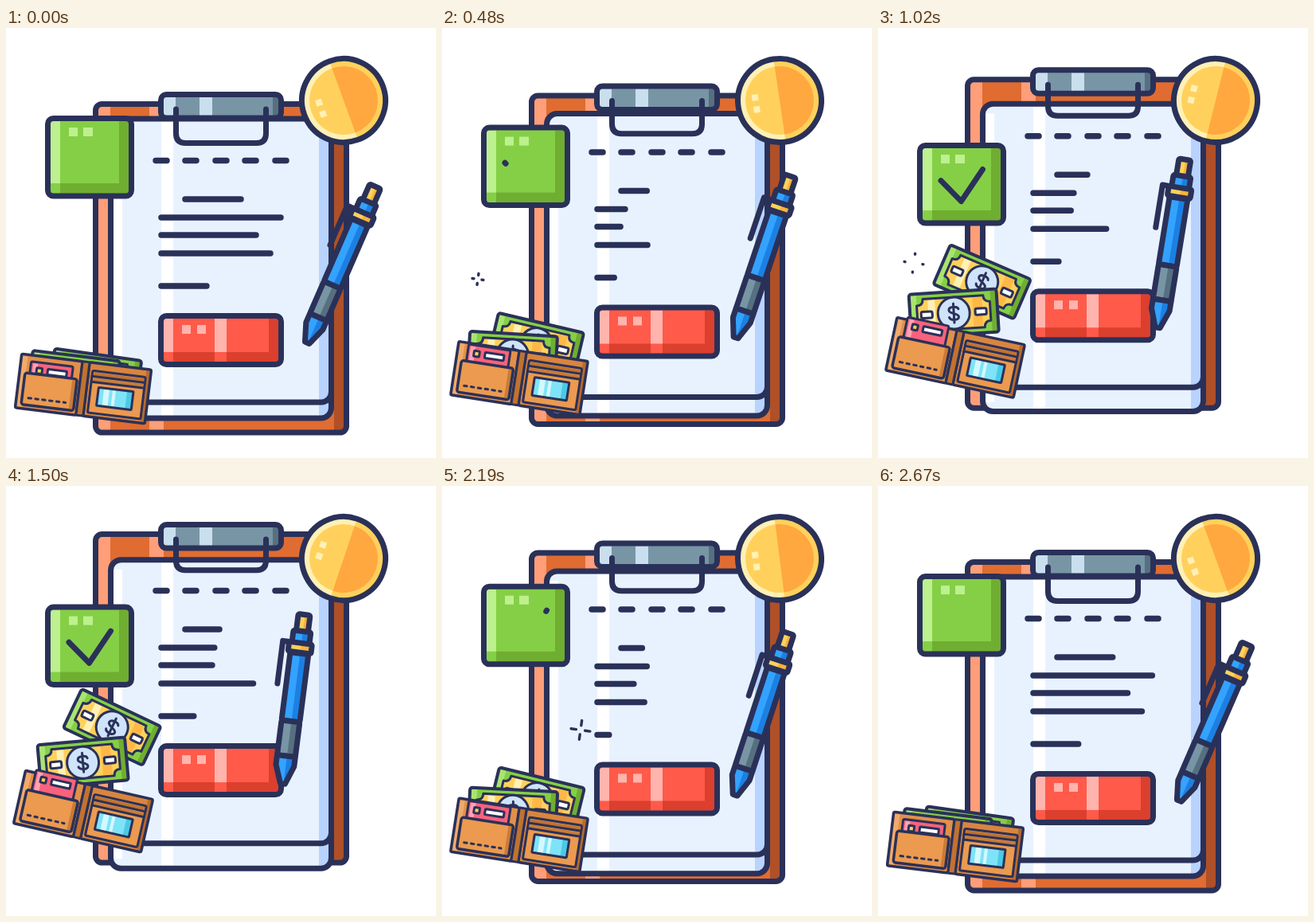
Write an HTML page that moves like this. It is 540 px wide and 540 px high and loops after 2700 ms.

```html
<!DOCTYPE html>
<html lang="en">
<head>
<meta charset="utf-8">
<style>
  html, body { margin: 0; width: 100%; height: 100%; overflow: hidden; background: #fff; }
  svg { display: block; width: 100%; height: 100%; }
</style>
</head>
<body>
<svg id="stage" viewBox="0 0 540 540" stroke-linecap="round" stroke-linejoin="round"></svg>
<script>
const LOOP = 2700;
const NAVY = '#2a3159';
const stage = document.getElementById('stage');

const rect = (x, y, w, h, fill) => `<rect x="${x}" y="${y}" width="${w}" height="${h}" fill="${fill}"/>`;
const line = (d, width = 7, fill = 'none', extra = '') =>
  `<path d="${d}" fill="${fill}" stroke="${NAVY}" stroke-width="${width}" ${extra}/>`;
// Rounded box: fill, shading on top, then the outline
const box = (x, y, w, h, r, fill, shading = '', width = 7) => {
  const shape = `<rect x="${x}" y="${y}" width="${w}" height="${h}" rx="${r}"`;
  return `${shape} fill="${fill}"/>${shading}${shape} fill="none" stroke="${NAVY}" stroke-width="${width}"/>`;
};
const group = (id, content) => `<g id="${id}">${content}</g>`;

const board = box(112.5, 95.5, 315, 412.5, 8, '#e06c31',
  rect(115, 98, 16, 407, '#ff9e78') + rect(180, 98, 18, 407, '#ff9e78') + rect(412, 98, 13, 407, '#af5028'));

const sheet = (y, h) => box(131.5, y, 277, h, 13, '#e8f2ff',
  rect(135, y + 12, 11, h - 24, '#fff') + rect(195, y, 15, h, '#fff') +
  `<path d="M393 ${y}H398Q408 ${y} 408 ${y + 12}V${y + h - 12}Q408 ${y + h} 398 ${y + h}H393Z" fill="#b9d3ff"/>`);

const clip = box(194.5, 83.5, 151, 29.5, 7, '#7895a6',
  rect(198, 87, 15, 23, '#c9dfee') + rect(243, 87, 16, 23, '#c9dfee') + rect(335, 87, 8, 23, '#56707f'));

const dashes = line([188, 225, 263, 300, 338].map(x => `M${x} 166.5h14`).join(''), 7.5);

const button = box(194.5, 361.5, 151, 61, 7, '#ff5a4a',
  rect(198, 365, 12, 42, '#ffb4ad') + rect(262, 365, 15, 42, '#ffb4ad') +
  rect(210, 407, 52, 12, '#db3f2e') + rect(277, 407, 65, 12, '#db3f2e') + rect(330, 365, 12, 54, '#db3f2e') +
  rect(221, 373, 11, 11, '#ffb4ad') + rect(240, 373, 11, 11, '#ffb4ad'));

const tick = box(52.5, 113.5, 105, 97.5, 7, '#85cf47',
  rect(56, 117, 12, 78, '#bdf08e') + rect(68, 195, 86, 13, '#6fae30') + rect(142, 117, 12, 91, '#6fae30') +
  rect(79, 125, 11, 11, '#bdf08e') + rect(97, 125, 12, 11, '#bdf08e')) +
  line('M79 157.6L104.5 183.6L131.5 143.5', 7, 'none', 'id="check" pathLength="1"');

const half = (r, fill) => `<path d="M0 ${-r}A${r} ${r} 0 0 1 0 ${r}Z" fill="${fill}"/>`;
const disc = (r, fill, extra = '') => `<circle r="${r}" fill="${fill}" ${extra}/>`;
const coin = disc(52.5, '#fff0b5') + half(52.5, '#ffd15c') + disc(43, '#ffd15c') + half(43, '#ffa83f') +
  rect(-34, -12, 8, 8, '#fff0b5') + rect(-34, 3, 8, 8, '#fff0b5') +
  disc(52.5, 'none', `stroke="${NAVY}" stroke-width="7"`);

// Pen stands upright with its point at the origin
const barrel = (top, height, w, light, dark) =>
  box(-w / 2, -top, w, height, 2, light, rect(1, -top, w / 2 - 1, height, dark));
const BLUE = ['#34a2ff', '#1c80e3'], GOLD = ['#ffd15c', '#f7b23c'];
const pen = line('M-14-181H-22.5V-127') +
  barrel(217, 22, 15, ...GOLD) + barrel(196, 16, 22, ...BLUE) +
  barrel(168, 86, 23, ...BLUE) + barrel(181, 12, 29, ...GOLD) +
  barrel(82, 44, 23, '#7895a6', '#56707f') +
  `<path d="M-11.5-38V-26L-3-3H3L11.5-26V-38Z" fill="${BLUE[0]}"/>` +
  `<path d="M1-38V-3H3L11.5-26V-38Z" fill="${BLUE[1]}"/>` +
  line('M-11.5-38V-26L-3-3H3L11.5-26V-38Z');

const bill = box(-55, -27, 110, 54, 3, '#85cf47',
  rect(-53, -25, 7, 50, '#a9e470') + rect(47, -25, 6, 50, '#6fae30'), 4) +
  line('M-38-20H38Q38-12 46-12V12Q38 12 38 20H-38Q-38 12-46 12V-12Q-38-12-38-20Z', 3, '#ffd15c') +
  rect(-32, -18, 9, 36, '#fff0b5') + rect(24, -18, 12, 36, '#ffb848') +
  disc(20, '#cfe3fb', `stroke="${NAVY}" stroke-width="3"`) +
  line('M6-5C5-9-6-9-6-4S6 0 6 5-5 9-6 5M0-12V12', 3) +
  box(-41, -4, 14, 8, 2, '#fff', '', 3) + box(27, -4, 14, 8, 2, '#fff', '', 3);

const card = box(-69, 0, 53, 34, 2, '#f9627d', rect(-66, 2, 6, 30, '#ffa3b3'), 3) +
  box(-61, 7, 7, 7, 1, '#ffd15c', '', 3) + box(-47, 7, 24, 7, 1, '#fff', '', 3);

const wallet = box(-82, -34, 77, 68, 2, '#e2904a', rect(-80, -32, 6, 64, '#f0aa6c'), 3.5) +
  box(4, -34, 78, 68, 2, '#d9853f', rect(76, -32, 5, 64, '#b96a2c'), 3.5) +
  box(-5, -34, 9, 68, 1, '#c1722f', '', 3) +
  group('card', card) +
  box(-75, -11, 66, 40, 3, '#eb9a4f', rect(-15, -9, 5, 36, '#c97b37'), 3.5) +
  line('M-67 20H-20', 3, 'none', 'stroke-dasharray="3.5 5.4"') +
  box(9, -24, 67, 53, 2, '#eb9a4f', rect(11, -22, 63, 4, '#c1722f') + rect(11, -15, 63, 4, '#c97b37'), 3) +
  line('M9-17H76M9-10H76', 3) +
  box(19, -4, 44, 23, 1, '#7fe3f7', rect(26, -3, 7, 21, '#d3f8ff') + rect(37, -3, 4, 21, '#d3f8ff') +
    rect(55, -3, 7, 21, '#4cc9e6'), 3);

// x, y, then lengths at the key times below
const KEYS = [0, 540, 1440, 2100, LOOP];
const ROWS = [
  [225, 215, 70, 31, 43.5, 23.5, 70],
  [195, 238, 150, 31, 67, 56.5, 150],
  [195, 260, 119, 26, 64.5, 41, 119],
  [195, 283, 137, 60.5, 117, 54, 137],
  [195, 324, 57, 20, 41.5, 12, 57],
];
// x, y, start time
const SPARKS = [[45, 326, 375], [174, 318, 1730]];

stage.innerHTML =
  group('board', board) + group('back', sheet(130, 360)) + group('front', sheet(114, 356)) +
  group('wire', line('', 7, 'none', 'id="wirePath"')) +
  group('content', clip + line('M213.5 102V113M326.5 102V113') + dashes + line('', 7.5, 'none', 'id="rows"') + button) +
  group('coin', coin) + group('pen', pen) + group('tick', tick) +
  SPARKS.map((_, i) => line('', 3.4, 'none', `id="spark${i}"`)).join('') +
  group('rearBill', bill) + group('frontBill', bill) + group('wallet', wallet);

const el = id => document.getElementById(id);
const place = (id, x, y, angle = 0) => el(id).setAttribute('transform', `translate(${x} ${y}) rotate(${angle})`);
const draw = (id, d) => el(id).setAttribute('d', d);
const ease = u => { u = Math.min(1, Math.max(0, u)); return u * u * (3 - 2 * u); };

function rowLength(lengths, t) {
  const i = KEYS.findIndex(k => k > t) - 1;
  return lengths[i] + (lengths[i + 1] - lengths[i]) * ease((t - KEYS[i]) / (KEYS[i + 1] - KEYS[i]));
}

function render(t) {
  const p = ease(1 - Math.abs(t / LOOP * 2 - 1));
  const lift = -36.2 * p;

  place('board', 0, lift);
  place('back', 0, -10 * p);
  place('front', 0, -22 * p);
  place('content', 0, lift);
  place('wire', 0, lift);
  draw('wirePath', `M213.5 102V${132.5 - 4 * p}q0 12 12 12h89q12 0 12 -12V102`);
  draw('rows', ROWS.map(([x, y, ...lengths]) => `M${x} ${y}h${rowLength(lengths, t)}`).join(''));

  place('coin', 424, 91, -20 + 40 * p);
  place('pen', 377 - 31 * p, 398 - 22 * p, 23.5 - 16.8 * p);

  place('tick', 0, 40 * p);
  const from = ease((t - 1830) / 390), to = ease((t - 450) / 390), check = el('check');
  check.setAttribute('stroke-dasharray', `${to - from} 3`);
  check.setAttribute('stroke-dashoffset', -from);
  check.setAttribute('visibility', to > from ? 'visible' : 'hidden');

  SPARKS.forEach(([x, y, start], i) => {
    const age = t - start;
    const a = 5 + 7 * ease((age - 400) / 320), b = 5 + 7 * ease(age / 300);
    place('spark' + i, x, y + lift, 8);
    draw('spark' + i, b > a ? `M0 ${-a}V${-b}M0 ${a}V${b}M${a} 0H${b}M${-a} 0H${-b}` : '');
  });

  place('wallet', 97, 453 - 46 * p, 7 + 6 * p);
  place('card', 0, -26 - 12 * Math.sqrt(p));
  place('rearBill', 112 + 22 * p, 437 - 139 * p, 8 + 18 * p);
  place('frontBill', 85 + 12 * p, 438.5 - 94.5 * p, 7 - 12.5 * p);
}

function tickFrame() {
  render(performance.now() % LOOP);
  requestAnimationFrame(tickFrame);
}
tickFrame();
</script>
</body>
</html>
```
